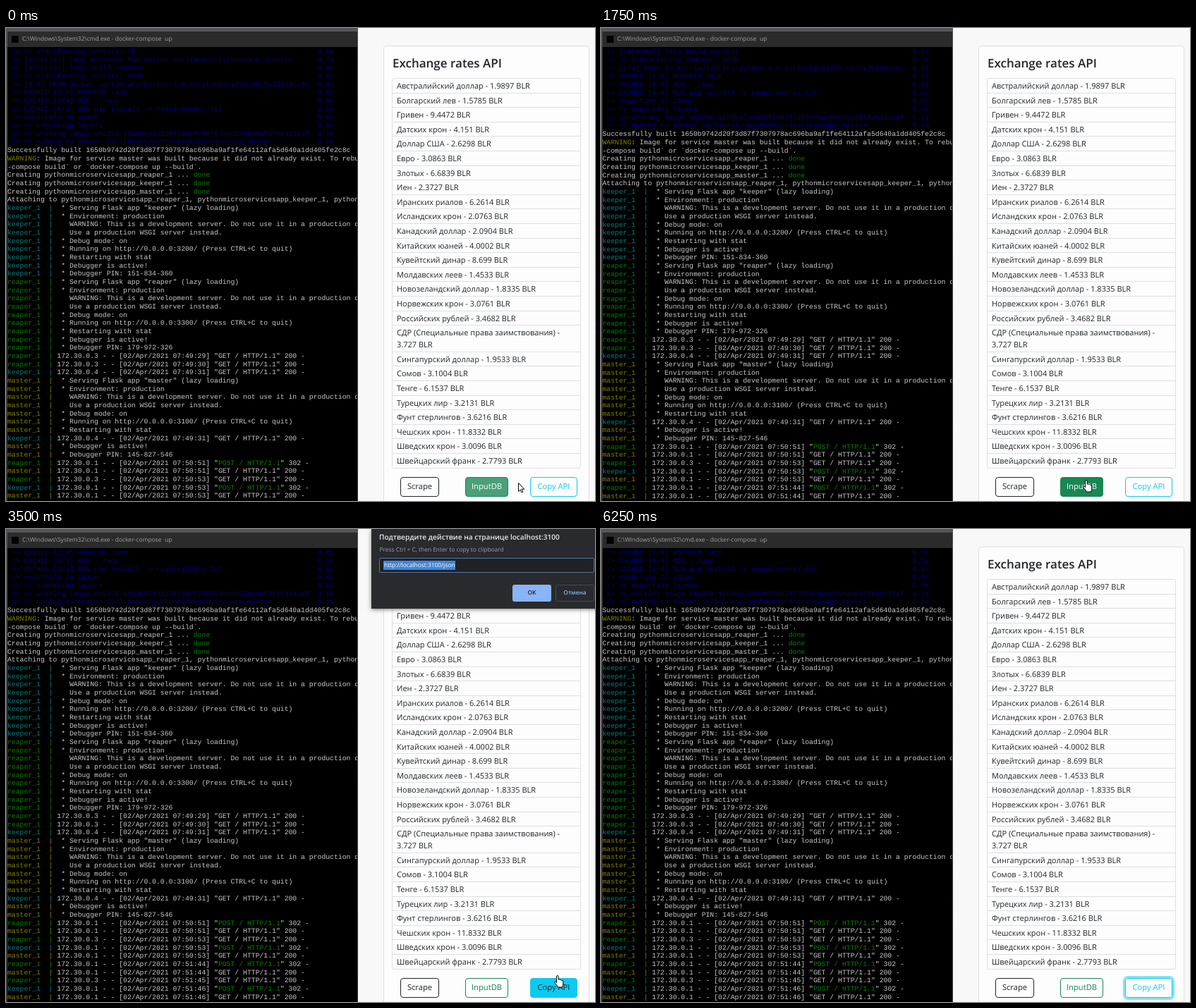
An HTML page that plays this animation: 835x671 px, repeating every 6.75 s.

```html
<!DOCTYPE html>
<html lang="ru">
<head>
<meta charset="utf-8">
<title>Exchange rates API</title>
<style>
html, body { margin: 0; width: 100%; height: 100%; overflow: hidden; }
body {
  position: relative; background: #f8f8f8; color: #212529;
  font: 11px/17px "Open Sans", "Noto Sans", sans-serif;
  text-rendering: geometricPrecision; white-space: pre;
}
body *, .abs { box-sizing: border-box; }
.abs { position: absolute; }

#desk { left: 0; top: 0; width: 499px; height: 671px; background: linear-gradient(#55565a, #3a3a38); }
#bar { left: 2px; top: 5px; width: 496px; height: 22px; background: #2b2b2b; color: #a0a0a0; font-size: 8.5px; line-height: 22px; }
#icon { left: 6px; top: 6px; width: 10px; height: 10px; background: #000; }
#term { left: 2px; top: 27px; width: 496px; height: 644px; background: #000; overflow: hidden; }
#log {
  left: 0; top: 1.1px; margin: 0; color: #c8c8c8;
  font: 9.77px/11.67px "Liberation Mono", "DejaVu Sans Mono", monospace;
}
.blue { color: #00007c; }
.done, .reaper { color: #008000; }
.keeper { color: #008080; }
.warn, .master { color: #808000; }

#card { left: 535px; top: 25px; width: 292px; height: 660px; background: #fdfdfd; border: 1px solid #dfdfdf; border-radius: 4px; }
#title { left: 548px; top: 38px; font-size: 17px; font-weight: 600; line-height: 24px; }
#rates { left: 547px; top: 71px; width: 268px; height: 554px; border: 1px solid #dfdfdf; border-radius: 3px; overflow: hidden; }
#rates div { height: 20.6px; padding: 2px 6px 0; border-bottom: 1px solid #dfdfdf; }
#rates div.tall { height: 37.8px; }
#rates div:last-child { border: 0; }
.btn { top: 637px; height: 28px; border: 1px solid; border-radius: 4px; font-size: 11.2px; line-height: 26px; text-align: center; }

#dialog { left: 518px; top: 0; width: 330px; height: 113px; background: #292a2d; color: #e8eaed; box-shadow: 0 1px 6px #0008; }
#ask { left: 11px; top: 3px; font-size: 10.1px; font-weight: 600; }
#hint { left: 11.5px; top: 21px; font-size: 8.4px; color: #9aa0a6; }
#field { left: 11px; top: 41px; width: 305px; height: 21px; background: #202124; border: 1px solid; border-radius: 2px; }
#url { left: 5px; top: 3px; height: 13px; padding: 0 1px; background: #4285d6; color: #fff; font-size: 8.4px; line-height: 13px; }
.choice { top: 79px; height: 24px; border-radius: 3px; font-size: 8.3px; font-weight: 600; line-height: 23px; text-align: center; }
#ok { left: 200px; width: 55px; background: #8ab4f8; color: #202124; }
#cancel { left: 261px; width: 55px; border: 1px solid #47494e; color: #8ab4f8; line-height: 21px; }
#cursor { left: 0; top: 0; overflow: visible; }
#cursor path { fill: #fff; stroke: #000; stroke-linejoin: round; }
</style>
</head>
<body>
<div class="abs" id="desk">
  <div class="abs" id="bar"><span class="abs" id="icon"></span><span class="abs" style="left:21px">C:\Windows\System32\cmd.exe - docker-compose  up</span></div>
  <div class="abs" id="term"><pre class="abs" id="log"></pre></div>
</div>
<div class="abs" id="card"></div>
<div class="abs" id="title">Exchange rates API</div>
<div class="abs" id="rates"></div>
<div class="abs btn" id="scrape" style="left:559px;width:55px">Scrape</div>
<div class="abs btn" id="input" style="left:651px;width:61px">InputDB</div>
<div class="abs btn" id="copy" style="left:743px;width:67px">Copy API</div>
<div class="abs" id="dialog">
  <div class="abs" id="ask">Подтвердите действие на странице localhost:3100</div>
  <div class="abs" id="hint">Press Ctrl + C, then Enter to copy to clipboard</div>
  <div class="abs" id="field"><span class="abs" id="url">http://localhost:3100/json</span></div>
  <div class="abs choice" id="ok">OK</div>
  <div class="abs choice" id="cancel">Отмена</div>
</div>
<svg class="abs" id="cursor" width="16" height="20">
  <path id="arrow" d="M.5.5V12.5L3.2 10 5 14 6.8 13.2 5 9.2H8.8Z"/>
  <path id="hand" d="M3.5 10.5V2Q3.5.5 4.8.5T6.2 2V6.2Q7.4 5.4 8.4 6.6 9.6 6 10.5 7.2 12.8 6.6 12.8 9V12Q12.8 14.5 11.5 17H5.2Q4.6 14.8 2 12.2L.7 10.3Q.4 8.8 1.8 9Z"/>
</svg>
<script>
const $ = id => document.getElementById(id);
const span = (kind, text) => `<span class="${kind}">${text}</span>`;

// Terminal log
const hash = '1650b9742d20f3d87f7307978ac696ba9af1fe64112afa5d640a1dd405fe2c8c';
const app = 'pythonmicroservicesapp_';
const repo = 'docker.io/library/';
const names = ['reaper', 'keeper', 'master'];
const build = (text, time = '0.0s') => span('blue', (' => ' + text).padEnd(75) + time);
const line = (who, text) => span(who, who + '_1  |') + text;
const boot = (who, port) => [
  ` * Serving Flask app "${who}" (lazy loading)`,
  ' * Environment: production',
  '   WARNING: This is a development server. Do not use it in a production deployment.',
  '   Use a production WSGI server instead.',
  ' * Debug mode: on',
  ` * Running on http://0.0.0.0:${port}/ (Press CTRL+C to quit)`,
  ' * Restarting with stat'
].map(s => line(who, ' ' + s));
const active = (who, pin) => [' * Debugger is active!', ' * Debugger PIN: ' + pin].map(s => line(who, ' ' + s));
const hit = (who, host, time, post) => line(who, ` 172.30.0.${host} - - [02/Apr/2021 07:${time}] "` +
  (post ? span('done', 'POST / HTTP/1.1') + '" 302 -' : 'GET / HTTP/1.1" 200 -'));

$('log').innerHTML = [
  build('=> transferring context: 2B'),
  build(`[internal] load metadata for ${repo}python:3.6-stretch`, '0.7s'),
  build('[internal] load build context'),
  build('=> transferring context: 202B'),
  build(`[1/4] FROM ${repo}python:3.6-stretch@sha256:68c5a316d3cc8c`),
  build('CACHED [2/4] WORKDIR /app'),
  build('CACHED [3/4] ADD . /app'),
  build('CACHED [4/4] RUN pip install -r requirements.txt'),
  build('exporting to image'),
  build('=> exporting layers'),
  build('=> writing image sha256:' + hash.slice(0, 45), '0.1s'),
  build(`=> naming to ${repo}${app}master`, '0.1s'),
  'Successfully built ' + hash,
  span('warn', 'WARNING') + ': Image for service master was built because it did not already exist. To rebuild',
  '-compose build` or `docker-compose up --build`.',
  ...names.map(n => `Creating ${app}${n}_1 ... ` + span('done', 'done')),
  'Attaching to ' + names.map(n => app + n + '_1').join(', '),
  ...boot('keeper', 3200), ...active('keeper', '151-834-360'),
  ...boot('reaper', 3300), ...active('reaper', '179-972-326'),
  hit('reaper', 3, '49:29'), hit('reaper', 3, '49:30'), hit('keeper', 4, '49:31'),
  ...boot('master', 3100), hit('keeper', 4, '49:31'), ...active('master', '145-827-546'),
  hit('reaper', 1, '50:51', true), hit('master', 1, '50:51'), hit('reaper', 3, '50:53'),
  hit('keeper', 1, '50:53', true), hit('master', 1, '50:53'),
  hit('reaper', 1, '51:44', true), hit('master', 1, '51:44'), hit('reaper', 3, '51:45'),
  hit('keeper', 1, '51:46', true), hit('master', 1, '51:46')
].join('\n');

// Rates list
$('rates').innerHTML = `Австралийский доллар - 1.9897
Болгарский лев - 1.5785
Гривен - 9.4472
Датских крон - 4.151
Доллар США - 2.6298
Евро - 3.0863
Злотых - 6.6839
Иен - 2.3727
Иранских риалов - 6.2614
Исландских крон - 2.0763
Канадский доллар - 2.0904
Китайских юаней - 4.0002
Кувейтский динар - 8.699
Молдавских леев - 1.4533
Новозеландский доллар - 1.8335
Норвежских крон - 3.0761
Российских рублей - 3.4682
СДР (Специальные права заимствования) -<br>3.727
Сингапурский доллар - 1.9533
Сомов - 3.1004
Тенге - 6.1537
Турецких лир - 3.2131
Фунт стерлингов - 3.6216
Чешских крон - 11.8332
Шведских крон - 3.0096
Швейцарский франк - 2.7793`.split('\n')
  .map(s => `<div${s.includes('<br>') ? ' class="tall"' : ''}>${s} BLR</div>`).join('');

// Timeline in steps of 250 ms
const STEP = 250, LOOP = 6750;
const path = [ // step, x, y
  [0, 726, 645], [3, 572, 654], [4, 572, 654], [6, 668, 642], [7, 683, 641], [9, 687, 645],
  [10, 712, 648], [13, 777, 633], [14, 777, 633], [15, 763, 475], [16, 735, 290], [17, 703, 140],
  [18, 720, 92], [19, 739, 92], [21, 739, 92], [24, 422, 600], [27, 422, 600]
];
const within = (s, a, b) => s >= a && s <= b;
const show = (id, on) => $(id).style.display = on ? '' : 'none';

function paint(id, rgb, hoverText, amount) {
  const style = $(id).style;
  style.borderColor = `rgb(${rgb})`;
  style.background = `rgba(${rgb},${amount})`;
  style.color = amount > .5 ? hoverText : `rgb(${rgb})`;
}

function draw(s) {
  const rows = s < 4 ? 0 : s < 8 ? 2 : s < 9 ? 3 : 5;
  $('log').style.transform = `translateY(${-rows * 11.67}px)`;

  paint('scrape', '33,37,41', '#fff', +(s === 3));
  paint('input', '25,135,84', '#fff', s === 0 ? .78 : s === 6 ? .8 : +(s === 1 || within(s, 7, 8)));
  paint('copy', '13,202,240', '#212529', s === 12 ? .7 : +within(s, 13, 21));
  $('copy').style.boxShadow = s >= 21 ? '0 0 0 3px rgba(13,202,240,.5)' : '';

  const closing = s === 21;
  show('dialog', within(s, 13, 21));
  $('dialog').style.transform = closing ? 'translateY(-1.5px)' : '';
  $('field').style.borderColor = closing ? '#303236' : '#54779f';

  const i = path.findIndex(p => p[0] > s);
  const [a, b] = [path[i - 1], path[i]];
  const k = (s - a[0]) / (b[0] - a[0]);
  const at = n => Math.round(a[n] + (b[n] - a[n]) * k);
  const hand = s === 1 || within(s, 3, 4) || within(s, 6, 9) || within(s, 12, 14);
  $('cursor').style.transform = `translate(${at(1)}px,${at(2)}px)`;
  show('cursor', s < 25);
  show('hand', hand);
  show('arrow', !hand);
}

const start = performance.now();
let last = -1;
function tick() {
  const s = Math.floor((performance.now() - start) % LOOP / STEP);
  if (s !== last) draw(last = s);
  requestAnimationFrame(tick);
}
tick();
</script>
</body>
</html>
```
